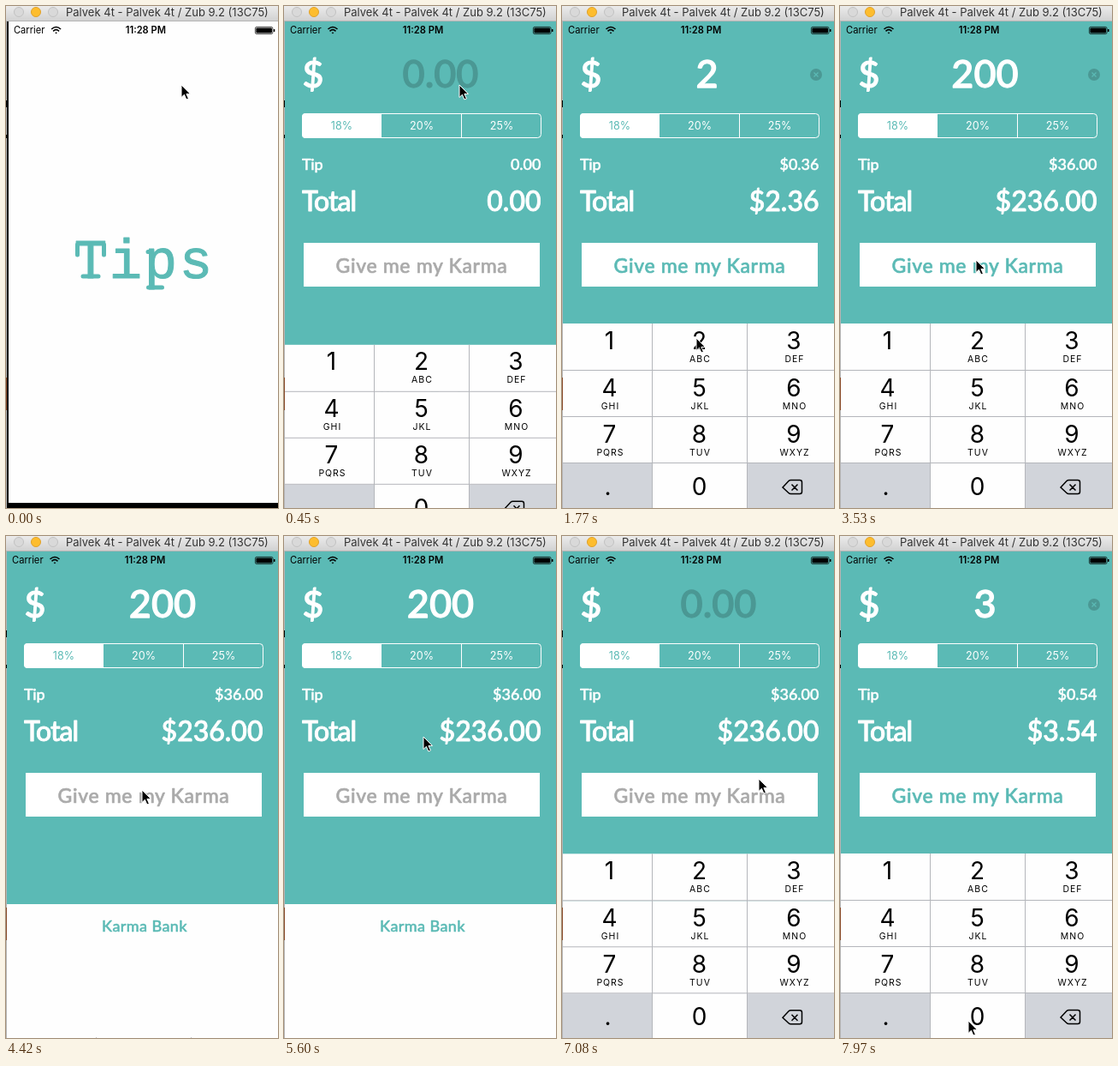
Animation of 318x585 px, one loop 8 s. Source, as an HTML page:

```html
<!DOCTYPE html>
<html lang="en">
<head>
<meta charset="utf-8">
<title>Tip calculator</title>
<style>
  html, body { margin: 0; width: 100%; height: 100%; overflow: hidden; }
  svg { display: block; width: 100%; height: 100%; }
  text { font-family: Inter, Roboto, sans-serif; }
  .geo text {
    font-family: Lato, sans-serif; font-weight: 500; color: #fff;
    fill: currentColor; stroke: currentColor; stroke-width: .028em; stroke-linejoin: round;
  }
  .mid { text-anchor: middle; }
  .end { text-anchor: end; }
  .geo .teal { color: #5bbab5; }
  .line { fill: none; stroke: #fff; }
  #segments text { font-size: 12.6px; fill: #fff; }
  #segments .on { fill: #5bbab5; }
  .digit { font-size: 28px; }
  .letters { font-size: 10.5px; letter-spacing: 1px; }
  .wordmark { font: 64px 'Liberation Mono', monospace; letter-spacing: 2.6px; }
</style>
</head>
<body>
<svg viewBox="0 0 318 585" preserveAspectRatio="none">
  <defs>
    <linearGradient id="bar" x2="0" y2="1">
      <stop stop-color="#ebebeb"/><stop offset="1" stop-color="#d2d2d2"/>
    </linearGradient>
  </defs>

  <!-- desktop edge behind the window -->
  <rect width="318" height="585" fill="#b4b4b4"/>
  <path d="M0 110h1v8h-1zM0 150h1v4h-1z"/>
  <path d="M0 433h1v38h-1z" fill="#8a4a28"/>

  <g id="app" class="geo">
    <rect x="1" y="17" width="317" height="412" fill="#5bbab5"/>
    <rect x="1" y="429" width="317" height="156" fill="#fefefe"/>
    <text x="21.5" y="95" font-size="43">$</text>
    <text id="amount" class="mid" y="95" font-size="45"></text>
    <g id="clear">
      <circle cx="297" cy="80" r="7" fill="#4b9894"/>
      <path d="M294.5 77.5l5 5m0-5l-5 5" stroke="#5bbab5" stroke-width="1.2"/>
    </g>
    <text x="21" y="191" font-size="18" letter-spacing="-.3">Tip</text>
    <text id="tip" class="end" x="300.5" y="191" font-size="18"></text>
    <text x="21" y="238.5" font-size="32" letter-spacing="-1">Total</text>
    <text id="total" class="end" x="300.5" y="238.5" font-size="32"></text>
    <rect x="23" y="276" width="276" height="51" fill="#fff"/>
    <text id="button" class="mid" x="161" y="310.5" font-size="23" letter-spacing=".65">Give me my Karma</text>
    <text class="mid teal" x="162" y="461" font-size="18" letter-spacing=".4">Karma Bank</text>
  </g>

  <g id="segments" class="mid">
    <path d="M114 125H25q-4 0-4 4v21q0 4 4 4h89z" fill="#fff"/>
    <rect class="line" x="21.5" y="125.5" width="279" height="28" rx="4"/>
    <path class="line" d="M113.5 125v29M207.5 125v29"/>
    <text class="on" x="67.5" y="144">18%</text>
    <text x="161" y="144">20%</text>
    <text x="254.5" y="144">25%</text>
  </g>

  <g id="splash">
    <path id="frame" d="M1 18H318V585H1z"/>
    <rect id="page" y="18" fill="#fefefe"/>
    <g fill="#5bbab5" stroke="#5bbab5" stroke-linecap="round" stroke-linejoin="round">
      <text class="wordmark" x="79.8" y="317">Tips</text>
      <path d="M83.500 278v12M114.500 278v12M90 315h18M166.500 328h16M166 286.500h4" stroke-width="5"/>
    </g>
  </g>

  <g id="status" font-size="11.2">
    <text x="7" y="32">Carrier</text>
    <g fill="none" stroke="#000" stroke-width="1.6">
      <path d="M51.500 27q5.500-5 11 0M53.500 29.300q3.500-3.200 7 0"/>
      <path d="M55.700 31q1.300-1.200 2.600 0L57 32.400z" fill="#000" stroke="none"/>
    </g>
    <text class="mid" x="162.500" y="32" font-weight="600">11:28 PM</text>
    <rect x="291.400" y="24.400" width="20.700" height="8.200" rx="1.800" fill="none" stroke="#000" stroke-width=".7"/>
    <rect x="292.400" y="25.400" width="18.700" height="6.200" rx="1"/>
    <rect x="313" y="27" width="1.500" height="3"/>
  </g>

  <g id="keyboard"></g>

  <rect width="318" height="17" fill="url(#bar)"/>
  <path d="M0 17.500H318" stroke="#b5b5b5"/>
  <g fill="#d9d9d9" stroke="#c2c2c2">
    <circle cx="15" cy="7" r="5.500"/>
    <circle cx="35" cy="7" r="5.500" fill="#fdbd2e" stroke="#e0a12a"/>
    <circle cx="55" cy="7" r="5.500"/>
  </g>
  <text x="70" y="12" font-size="13" fill="#333">Palvek 4t - Palvek 4t / Zub 9.2 (13C75)</text>

  <path id="pointer" d="M0 0V14.500l3.400-3.200 2.500 5.700 2.500-1.100-2.500-5.500H10.500z" stroke="#fff"/>
</svg>
<script>
const LOOP = 8000, STEP = 147.5, TIP_RATE = 0.18, KEYBOARD_HEIGHT = 215;
const $ = id => document.getElementById(id);
const set = (id, attrs) => {
  for (const name in attrs) $(id).setAttribute(name, attrs[name]);
};

// Keypad
const columns = [1, 106, 217, 318], rows = [370, 425, 479, 533, 585];
const labels = ['1', '2 ABC', '3 DEF', '4 GHI', '5 JKL', '6 MNO',
                '7 PQRS', '8 TUV', '9 WXYZ', '.', '0', ''];
const centers = [55.5, 160.5, 271];
$('keyboard').innerHTML = labels.map((label, i) => {
  const c = i % 3, r = Math.floor(i / 3);
  const [digit, letters = ''] = label.split(' ');
  const x = columns[c], y = rows[r], mid = centers[c] - (digit === '.' ? 2 : 0);
  const baseline = y + (r === 3 ? 37 : 29.5);
  return `<rect id="key${i}" x="${x}" y="${y}" width="${columns[c + 1] - x}" height="${rows[r + 1] - y}"/>
    <text class="digit mid" x="${mid}" y="${baseline}">${digit}</text>
    <text class="letters mid" x="${mid + 1}" y="${y + 44.5}">${letters}</text>`;
}).join('') + `
  <path d="M1 424.5H318M1 478.5H318M1 532.5H318M105.5 370V585M216.5 370V585" stroke="#b4b6bb"/>
  <path d="M258 561l7-7.500q1-1 2.500-1H278q2.500 0 2.500 2.500v11q0 2.500-2.500 2.500H267.500q-1.500 0-2.500-1z
    M268.500 557.500l7 7m0-7l-7 7" fill="none" stroke="#000" stroke-width="1.5"/>`;

// Pointer stops: time, x, y
const stops = [
  [0, 205, 92], [600, 205, 92], [1180, 157, 387], [1770, 157, 387],
  [2210, 155, 551], [2950, 155, 566], [3530, 159, 296], [5170, 159, 296],
  [6340, 173, 97], [6640, 173, 97], [7380, 262, 388], [7680, 262, 388], [7965, 150, 565]
];
// Entries: time, amount typed
const entries = [[0, ''], [1620, '2'], [2650, '20'], [2945, '200'], [6480, ''], [7665, '3']];
// Key presses: start, end, key index
const presses = [[1470, 1610, 1], [2500, 2640, 10], [2800, 2940, 10], [7515, 7660, 2]];

const smooth = p => p * p * (3 - 2 * p);

function pointerAt(t) {
  const i = stops.findIndex(s => s[0] > t);
  if (i < 0) return stops[stops.length - 1].slice(1);
  const [t0, x0, y0] = stops[i - 1], [t1, x1, y1] = stops[i];
  const p = smooth((t - t0) / (t1 - t0));
  return [x0 + (x1 - x0) * p, y0 + (y1 - y0) * p];
}

// Critically damped approach, 1 at the start and 0 at rest
function settle(t) {
  const x = Math.max(0, t) * 0.0147;
  return (1 + x) * Math.exp(-x);
}

function keyboardOffset(t) {
  if (t < 3960) return KEYBOARD_HEIGHT * settle(t - 190);
  if (t < 6480) return KEYBOARD_HEIGHT * (1 - settle(t - 3900));
  return KEYBOARD_HEIGHT * settle(t - 6487);
}

function draw(t) {
  const typed = entries.filter(e => e[0] <= t).pop()[1];
  const editing = t < 3960 || t >= 6480;
  const amount = Number(typed || (t > 3000 ? 200 : 0));
  const money = v => (amount ? '$' : '') + v.toFixed(2);

  $('amount').textContent = typed || '0.00';
  set('amount', { x: typed && editing ? 169.5 : 183, style: 'color:' + (typed ? '#fff' : '#4b9894') });
  set('clear', { opacity: typed && editing ? 1 : 0 });
  $('tip').textContent = money(amount * TIP_RATE);
  $('total').textContent = money(amount * (1 + TIP_RATE));
  set('button', { style: 'color:' + (typed && editing ? '#5bbab5' : '#aaa') });

  const launching = t < 140;
  set('splash', { opacity: Math.min(1, Math.max(0, (430 - t) / 270)) });
  set('frame', { opacity: launching ? 1 : 0 });
  set('page', launching ? { x: 3, width: 315, height: 561 } : { x: 1, width: 317, height: 567 });
  set('status', { transform: launching ? 'translate(2 0) scale(.993 1)' : '' });

  const offset = keyboardOffset(t);
  set('keyboard', { transform: `translate(0 ${offset.toFixed(1)})`, opacity: offset > 214.5 ? 0 : 1 });
  labels.forEach((_, i) => {
    const pressed = presses.some(([from, to, key]) => key === i && t >= from && t < to);
    const gray = (i === 9 || i === 11) !== pressed;
    set('key' + i, { fill: gray ? '#d1d4da' : '#fefefe' });
  });
  set('pointer', { transform: `translate(${pointerAt(t).map(Math.round)})` });
}

const start = performance.now();
function tick() {
  const t = (performance.now() - start) % LOOP;
  draw(Math.floor((t + 12) / STEP) * STEP);
  requestAnimationFrame(tick);
}
tick();
</script>
</body>
</html>
```
